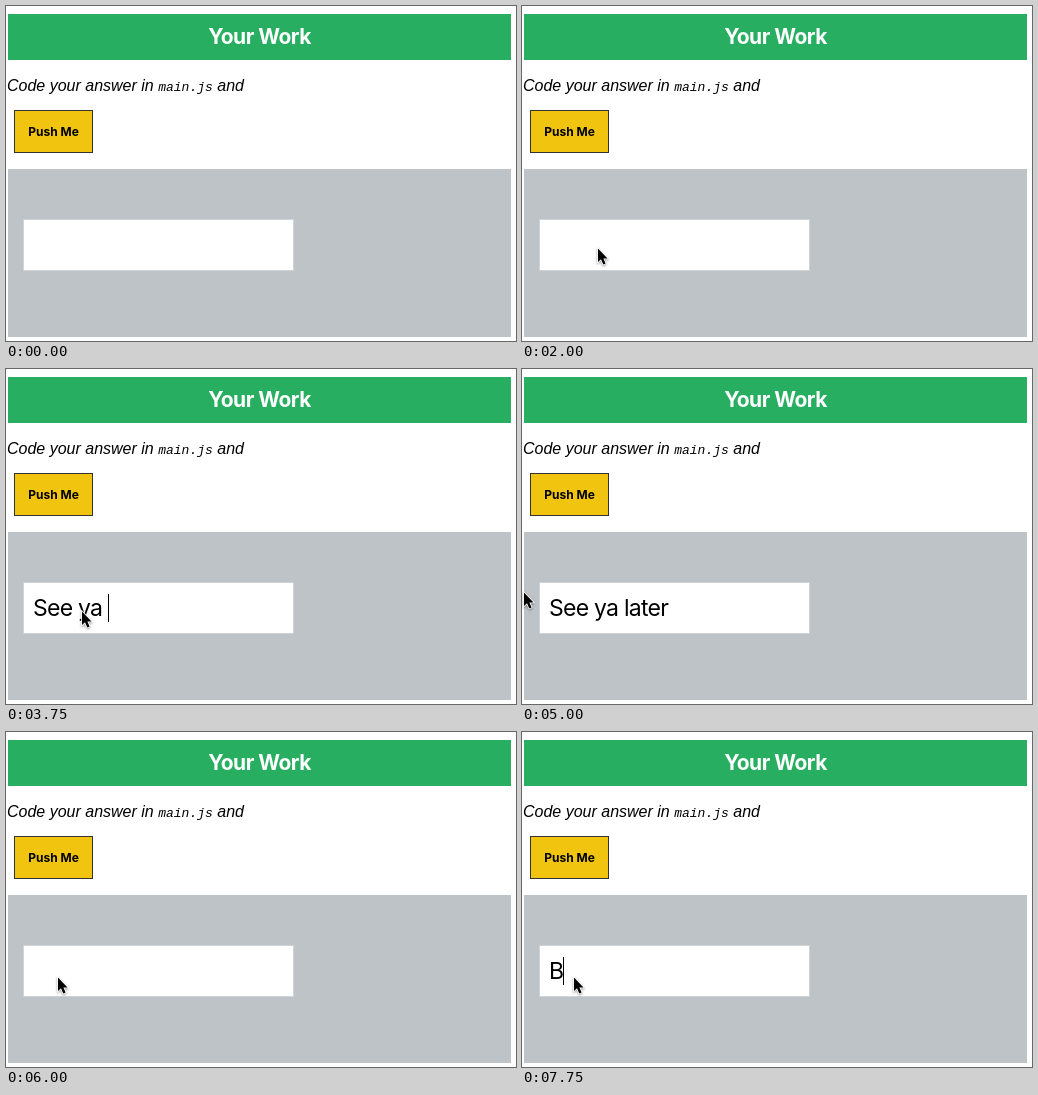
An HTML page that plays this animation: 510 px wide and 335 px high, repeating every 8 s.

```html
<!DOCTYPE html>
<html lang="en">
<head>
<meta charset="utf-8">
<title>Your Work</title>
<style>
  html, body { margin: 0; width: 510px; height: 335px; overflow: hidden; background: #fff; }
  body { position: relative; font-family: Inter, sans-serif; }
  body > * { position: absolute; box-sizing: border-box; white-space: pre; }
  h1 { left: 2px; top: 8px; width: 503px; height: 46px; margin: 0; background: #27ae60; color: #fff;
       font-size: 21px; font-weight: 700; line-height: 45px; letter-spacing: -.5px; text-align: center; }
  p { left: 1px; top: 70px; margin: 0; font: italic 16px/19px "Liberation Sans", sans-serif; }
  code { font: italic 13px/1 "Liberation Mono", monospace; }
  #button { left: 8px; top: 104px; width: 79px; height: 43px; border: 1px solid #333;
            font-size: 12px; font-weight: 700; line-height: 42px; text-align: center; }
  #panel { left: 2px; top: 163px; width: 503px; height: 168px; background: #bdc3c7; }
  #field { left: 17px; top: 213px; width: 271px; height: 52px; background: #fff; border: 1px solid #d0d3d5;
           padding-left: 9px; font-size: 23px; line-height: 51px; letter-spacing: -.75px; }
  #caret { position: absolute; top: 11px; width: 1px; height: 28px; background: #000; }
  #pointer { width: 13px; height: 18px; overflow: visible; filter: drop-shadow(0 1px 1px #0006); }
</style>
</head>
<body>
<h1>Your Work</h1>
<p>Code your answer in <code>main.js</code> and</p>
<div id="button">Push Me</div>
<div id="panel"></div>
<div id="field"><span id="text"></span><span id="caret"></span></div>
<svg id="pointer"><path d="M2 .5V14l3-2.8 2.3 5.2 2.3-1-2.2-5H11.500Z" stroke="#fff" stroke-width="1.600" paint-order="stroke"/></svg>
<script>
const [button, text, caret, pointer] = ['button', 'text', 'caret', 'pointer'].map(id => document.getElementById(id));

// Each track is a list of [start time, value]; a value holds until the next one.
const pointerTrack = [[0, null], [750, [136, 133]], [1000, [112, 203]], [1250, [105, 225]], [1500, [86, 237]],
  [2000, [74, 242]], [5000, [0, 223]], [5250, [16, 152]], [5500, [35, 136]], [5750, [36, 138]], [6000, [50, 245]]];
const textTrack = [[0, ''], [3000, 'S'], [3250, 'Se'], [3500, 'See '], [3750, 'See ya '], [4000, 'See ya l'],
  [4250, 'See ya lat'], [4500, 'See ya later'], [5750, ''], [7750, 'B']];
const caretTrack = [[0, false], [2250, true], [2750, false], [3000, true], [5000, false],
  [6500, true], [7000, false], [7500, true]];
const hoverTrack = [[0, false], [5500, true], [6000, false]];

const valueAt = (track, t) => track.findLast(([start]) => start <= t)[1];

function draw(now) {
  const t = now % 8000;
  const spot = valueAt(pointerTrack, t);
  pointer.style.display = spot ? '' : 'none';
  if (spot) [pointer.style.left, pointer.style.top] = spot.map(v => v + 'px');
  text.textContent = valueAt(textTrack, t);
  caret.style.left = Math.round(9 + text.offsetWidth) + 'px';
  caret.hidden = !valueAt(caretTrack, t);
  button.style.background = valueAt(hoverTrack, t) ? '#f39c12' : '#f1c40f';
  requestAnimationFrame(draw);
}
draw(0);
</script>
</body>
</html>
```
